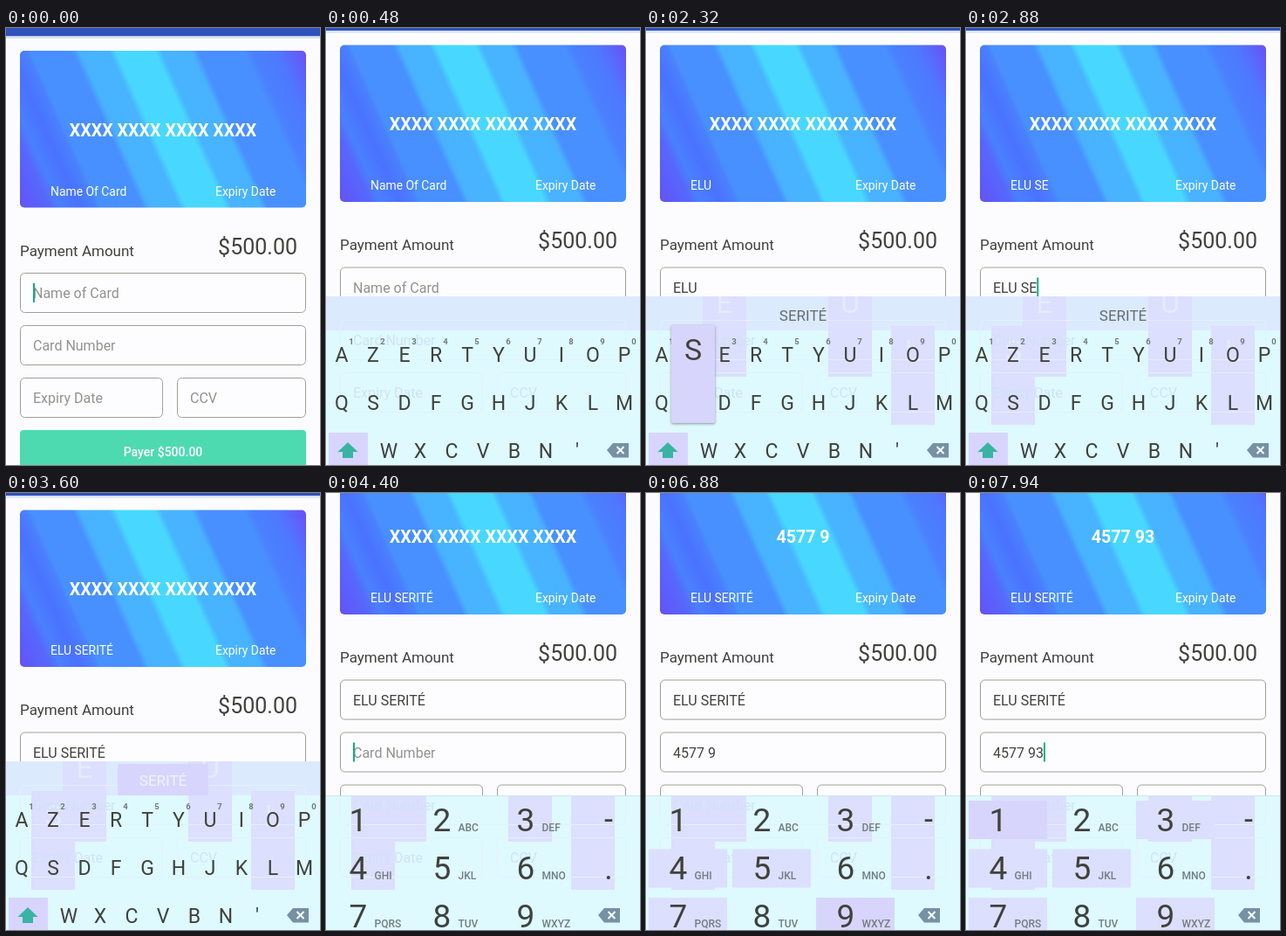
Recreate the animation shown at these times as an HTML page with a canvas. Size 360 px wide and 500 px high, loop 8000 ms.

```html
<!DOCTYPE html>
<html lang="en">
<head>
<meta charset="utf-8">
<title>Card payment form</title>
<style>
html, body { margin: 0; width: 100%; height: 100%; overflow: hidden; background: #fcfcff; }
canvas { display: block; width: 360px; height: 500px; }
</style>
</head>
<body>
<canvas id="stage" width="360" height="500"></canvas>
<script>
const ctx = document.getElementById('stage').getContext('2d');
const LOOP = 8000;
const FONT = 'Roboto, "Open Sans", sans-serif';
const INK = '#40423c', HINT = '#92928e', LILAC = '#d8d5fd', TRACE = '#dcdffe', SKY = '#defaff';

const SWAP = 3920;
const names = [[0, ''], [1040, 'E'], [1520, 'EL'], [1840, 'ELU'], [2400, 'ELU S'], [2720, 'ELU SE'], [3200, 'ELU SERITÉ']];
const numbers = [[0, ''], [5040, '4'], [5440, '45'], [6000, '457'], [6320, '4577'], [6800, '4577 9'], [7280, '4577 93']];
const hints = [
  [0, []], [1040, ['ELU', 'É', 'LE']], [1520, ['EL', 'ELU', 'ELLE']],
  [1840, ['ELUE', 'ELU', 'ÉLU']], [2080, ['', 'SERITÉ', '']]
];
const letterTaps = [['E', 960, 1120], ['L', 1360, 1560], ['U', 1760, 1920], ['S', 2320, 2480], ['E', 2640, 2800]];
const digitTaps = [[4, 4960, 5120], [5, 5360, 5520], [7, 5840, 6080], [7, 6240, 6400], [9, 6720, 6960], [3, 7200, 7360], [1, 7780, 8000]];
const rows = ['AZERTYUIOP', 'QSDFGHJKLM', 'WXCVBN\''];
const groups = ['', 'ABC', 'DEF', 'GHI', 'JKL', 'MNO', 'PQRS', 'TUV', 'WXYZ'];

const at = (list, t) => list.filter(e => e[0] <= t).pop()[1];
const ease = (t, from, to) => {
  const p = Math.min(1, Math.max(0, (t - from) / (to - from)));
  return 1 - (1 - p) ** 3;
};

function text(str, x, y, size, color, align = 'left', weight = 400) {
  ctx.font = `${weight} ${size}px ${FONT}`;
  ctx.textAlign = align;
  ctx.fillStyle = color;
  ctx.fillText(str, x, y);
}

function rect(x, y, w, h, color) {
  ctx.fillStyle = color;
  ctx.fillRect(x, y, w, h);
}

function round(x, y, w, h, r) {
  ctx.beginPath();
  ctx.roundRect(x, y, w, h, r);
}

function shape(points, color) {
  ctx.beginPath();
  for (const [x, y] of points) ctx.lineTo(x, y);
  ctx.closePath();
  ctx.fillStyle = color;
  ctx.fill();
}

// Slanted bands; each stop is the x where a band meets the card's top edge.
function cardFill() {
  const slant = 0.45, left = -66, length = 410;
  const k = length / (1 + slant * slant);
  const g = ctx.createLinearGradient(left, 26, left + k, 26 - k * slant);
  const stops = [
    [-66, '#6452f8'], [-30, '#5668fc'], [-18, '#4a80ff'], [4, '#4a72ff'], [22, '#4a80ff'],
    [28, '#4890ff'], [76, '#4890ff'], [84, '#48b2ff'], [118, '#48b4ff'], [126, '#48d8ff'],
    [170, '#48d8ff'], [178, '#48b4ff'], [212, '#48b2ff'], [220, '#4890ff'], [272, '#4890ff'],
    [282, '#4a80ff'], [310, '#4e78ff'], [344, '#6a50f8']
  ];
  for (const [x, color] of stops) g.addColorStop((x - left) / length, color);
  return g;
}

function field(x, y, w, value, hint, cursor) {
  round(x + 0.5, y + 0.5, w - 1, 45, 5);
  ctx.fillStyle = '#fdfdff';
  ctx.fill();
  ctx.strokeStyle = '#a0a094';
  ctx.lineWidth = 1;
  ctx.stroke();
  text(value || hint, x + 15, y + 29, 16, value ? INK : HINT);
  if (cursor) {
    const end = value ? ctx.measureText(value).width : 0;
    rect(x + 15 + end, y + 12, 2, 22, '#10b080');
  }
}

function drawPage(t, name, number) {
  const scroll = 6.5 * ease(t, 160, 400) + 60 * ease(t, SWAP, 4160);
  const first = t < SWAP;
  const blink = (t + (first ? 180 : 70)) % 1000 < 500;
  ctx.save();
  ctx.translate(0, -scroll);

  rect(0, 0, 360, 9.5, '#3052bc');
  rect(0, 9.5, 360, 2.5, '#d8e2f8');

  round(16, 26, 328, 179.5, 5);
  ctx.fillStyle = cardFill();
  ctx.fill();
  text(number || 'XXXX XXXX XXXX XXXX', 180, 123.5, 19.65, '#fff', 'center', 700);
  text(name || 'Name Of Card', 51, 191.5, 13.9, '#fff');
  text('Expiry Date', 240, 191.5, 13.9, '#fff');

  text('Payment Amount', 16, 260.5, 17, INK);
  text('$500.00', 334, 258.5, 25, INK, 'right');

  field(16, 280, 328, name, 'Name of Card', first && blink);
  if (first && name && t < 2080) {
    ctx.font = `400 16px ${FONT}`;
    rect(31, 311.5, ctx.measureText(name).width, 1, INK);
  }
  field(16, 340, 328, number, 'Card Number', !first && blink);
  field(16, 400, 164, '', 'Expiry Date');
  field(196, 400, 148, '', 'CCV');

  round(16, 460, 328, 46, 4);
  ctx.fillStyle = '#4edab0';
  ctx.fill();
  text('Payer $500.00', 180, 490, 14, '#fff', 'center', 500);
  ctx.restore();
}

function keySpot(letter) {
  const row = rows.findIndex(r => r.includes(letter));
  return { x: 18 + 36 * rows[row].indexOf(letter), row };
}

// Faint marks of the covered form and of earlier key presses.
function drawTraces(t, top) {
  ctx.save();
  ctx.beginPath();
  ctx.rect(0, top, 360, 500 - top);
  ctx.clip();
  for (const [letter, , end] of letterTaps) {
    if (t < end) continue;
    const { x, row } = keySpot(letter);
    rect(x - 25, 286 + 55 * row, 50, 113, TRACE);
    if (t < SWAP) text(letter, x, 326 + 55 * row, 34, '#e6ecff', 'center');
  }
  ctx.strokeStyle = '#e4f0ff';
  for (const [x, y, w] of [[16, 334, 328], [16, 394, 164], [196, 394, 148]]) {
    round(x + 0.5, y + 0.5, w - 1, 45, 5);
    ctx.stroke();
  }
  text('Card Number', 31, 363, 16, '#d0e2f6');
  text('Expiry Date', 31, 423, 16, '#d0e2f6');
  text('CCV', 211, 423, 16, '#d0e2f6');
  ctx.restore();
}

function backspace(x) {
  shape([[x, 483], [x + 7, 475], [x + 25, 475], [x + 25, 491.5], [x + 7, 491.5]], '#7890a4');
  ctx.beginPath();
  ctx.moveTo(x + 11.5, 479);
  ctx.lineTo(x + 19.5, 487);
  ctx.moveTo(x + 19.5, 479);
  ctx.lineTo(x + 11.5, 487);
  ctx.strokeStyle = '#f4ffff';
  ctx.lineWidth = 2;
  ctx.stroke();
  ctx.lineWidth = 1;
}

function shiftKey() {
  rect(3, 463, 45, 37, LILAC);
  shape([[25, 474], [36.5, 485], [31, 485], [31, 492], [19, 492], [19, 485], [13.5, 485]], '#38b4a4');
}

function drawHints(t) {
  if (t >= 3280) {
    text('SERITÉ', 180, 334.5, 17, '#f0f4ff', 'center');
    return;
  }
  const words = at(hints, t);
  words.forEach((word, i) => text(word, [81, 180, 278][i], 334.5, 17, '#686c70', 'center'));
  if (words[0]) {
    rect(128, 317, 1, 27, '#c4ccdc');
    rect(232, 317, 1, 27, '#c4ccdc');
    for (const x of [174, 180, 186]) {
      ctx.beginPath();
      ctx.arc(x, 344, 1.6, 0, 7);
      ctx.fillStyle = '#50545c';
      ctx.fill();
    }
  }
}

function drawLetters(t) {
  const rise = ease(t, 160, 400);
  if (!rise) return;
  ctx.save();
  ctx.translate(0, 193 * (1 - rise));
  rect(0, 307, 360, 193, SKY);
  rect(0, 307, 360, 39, '#dceafe');
  drawTraces(t, 307);
  if (t >= 3120) rect(128, 310, 104, 36, LILAC);
  drawHints(t);
  shiftKey();
  rows.forEach((row, r) => [...row].forEach((letter, i) => {
    const x = (r === 2 ? 72 : 18) + 36 * i;
    text(letter, x, 382 + 55 * r, 23, INK, 'center');
    if (r === 0) text((i + 1) % 10, x + 11, 362, 9.5, '#70787c', 'center', 700);
  }));
  backspace(322);

  const tap = letterTaps.find(([, from, to]) => t >= from && t < to);
  if (tap) {
    const { x, row } = keySpot(tap[0]);
    const y = 285 + 55 * row;
    ctx.save();
    ctx.shadowColor = 'rgba(70, 80, 60, 0.6)';
    ctx.shadowBlur = 3;
    ctx.shadowOffsetY = 1;
    round(x - 25, y, 50, 112, 2);
    ctx.fillStyle = LILAC;
    ctx.fill();
    ctx.restore();
    text(tap[0], x, y + 40, 34, INK, 'center');
  }
  ctx.restore();
}

function drawDigits(t) {
  rect(0, 346, 360, 154, SKY);
  drawTraces(t, 347);
  rect(0, 346, 360, 1, '#d0e4f0');
  for (const [digit, from, to] of digitTaps) {
    if (t < from) continue;
    const i = digit - 1;
    const y = 352 + 55.5 * Math.floor(i / 3);
    rect(3 + 96 * (i % 3), y, 90, 44, t < to ? LILAC : TRACE);
  }
  groups.forEach((group, i) => {
    const x = 37 + 96 * (i % 3), y = 387 + 55 * Math.floor(i / 3);
    text(i + 1, x, y, 37, INK, 'center');
    text(group, x + 18.5, y, 12, '#747c80', 'left', 500);
  });
  text('-', 324, 386, 36, INK, 'center');
  text('.', 324, 442, 36, INK, 'center');
  backspace(312);
}

function draw(now) {
  const t = now % LOOP;
  rect(0, 0, 360, 500, '#fcfcff');
  drawPage(t, at(names, t), at(numbers, t));
  if (t < SWAP) drawLetters(t);
  else drawDigits(t);
}

const start = performance.now();
function tick() {
  draw(performance.now() - start);
  requestAnimationFrame(tick);
}
tick();
</script>
</body>
</html>
```
